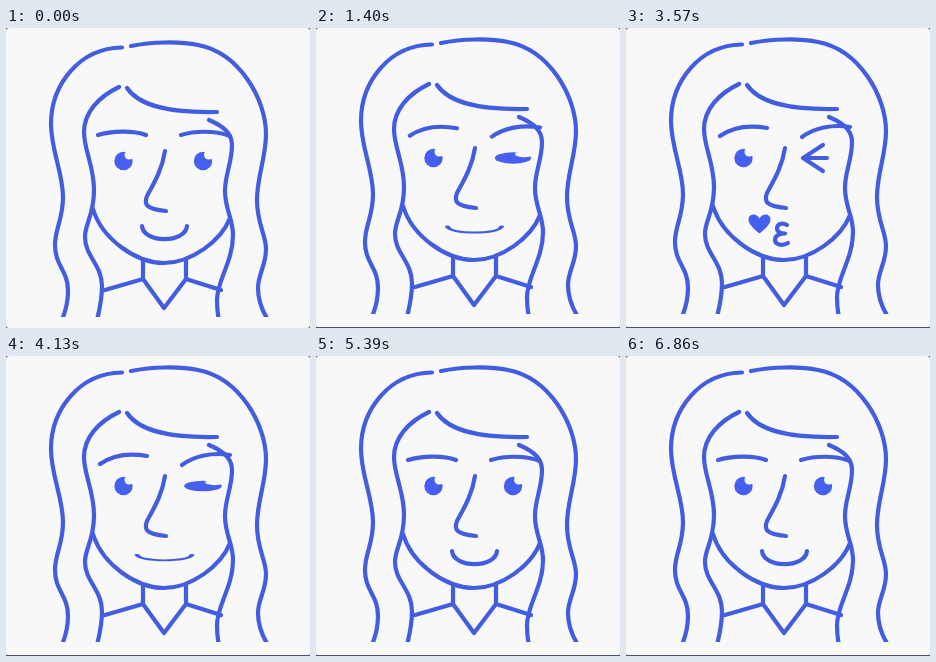
These frames come from a looping animation (304 px wide and 300 px high, 6.93 s). An HTML page:

```html
<!DOCTYPE html>
<html lang="en">
<head>
<meta charset="utf-8">
<title>Winking portrait</title>
<style>
  html, body { margin: 0; width: 100%; height: 100%; overflow: hidden; background: #55575f; }
  svg { display: block; width: 304px; height: 300px; }
  .ink { fill: none; stroke: #435de0; stroke-width: 4.2; stroke-linecap: round; stroke-linejoin: round; }
  .solid { fill: #4560ee; stroke: none; }
  .paper { fill: #f8f8f9; stroke: none; }
</style>
</head>
<body>
<svg viewBox="0 0 304 300">
  <defs>
    <clipPath id="crop"><rect width="304" height="289"/></clipPath>
    <g id="eye">
      <circle class="solid" r="9.2"/>
      <circle class="paper" cx="5.8" cy="-6.2" r="4.8"/>
    </g>
  </defs>
  <rect class="paper" width="304" height="300" rx="3"/>
  <rect id="edge" y="299" width="304" height="1" fill="#4b5079"/>

  <g id="figure">
    <g class="ink" clip-path="url(#crop)">
      <!-- hair -->
      <path d="M116 19.500C73 20 45 57 45 96C45 122 57 145 57 169C57 192 49 200 49 217C49 238 62 242 62 263Q62 277 56 292"/>
      <path d="M113 59C92 69 78 85 78 104C78 122 88 138 88 162C88 188 79 195 79 209C79 228 96 237 96 258Q96 272 91 292"/>
      <path d="M125 18C145 14 173 13 192 17C234 25 260 72 260 106C260 130 251 148 251 172C251 196 260 207 260 221C260 238 252 246 252 260Q252 276 262 292"/>
      <path d="M121 60C134 79 166 85 211 84"/>
      <path d="M203 92C217 98 226 105 226 117C226 135 219 146 219 163C219 182 227 190 227 207C227 234 211 252 211 272Q211 284 213 292"/>
      <!-- face, neck and collar -->
      <path d="M87 181C96 211 130 235 158 235C185 235 215 213 224 190"/>
      <path d="M137 232V251M180 232V251M99 262L137 251L158 280L180 251L215 262"/>
      <path d="M159 123C156 142 148 155 141 168C138 176 139 181 160 183"/>
    </g>
    <g class="ink">
      <path id="browLeft"/>
      <path id="browRight"/>
      <path id="mouth" d="M-22.500 -6.500C-21 11 21 11 22.500 -6.500"/>
      <path id="lashes"/>
      <path id="kiss" d="M5 -9C0 -12 -5 -10 -5 -5.500C-5 -2 -1 -.5 3 -.5C-3 -.5 -7 2 -7 6C-7 10.500 0 12.500 6 9"/>
    </g>
    <path id="heart" class="solid" d="M0 10C-5 6 -11 1 -11 -4C-11 -10 -3 -11 0 -5C3 -11 11 -10 11 -4C11 1 5 6 0 10Z"/>
    <use href="#eye" x="117.500" y="133"/>
    <use id="eyeRight" href="#eye"/>
  </g>
</svg>

<script>
const LOOP = 6930, SHIFT_AT = 1260;
const part = id => document.getElementById(id);

const ease = p => p * p * (3 - 2 * p);
const ramp = (t, from, to) => ease(Math.min(1, Math.max(0, (t - from) / (to - from))));
// Rises over one interval and falls over another
const pulse = (t, a, b, c, d) => ramp(t, a, b) * (1 - ramp(t, c, d));
const mix = (a, b, p) => a + (b - a) * p;

const BROW_LEFT = { rest: [92, 107, 105, 103, 127, 102, 140, 107], wink: [94, 111, 107, 102, 124, 100, 141, 103] };
const BROW_RIGHT = { rest: [175, 107, 188, 103, 208, 102, 224, 108], wink: [176, 112, 188, 103, 206, 99, 224, 102] };

function bendBrow(id, { rest, wink }, p) {
  const [x, y, ...curve] = rest.map((v, i) => mix(v, wink[i], p));
  part(id).setAttribute('d', `M${x} ${y}C${curve.join(' ')}`);
}

function place(id, x, y, sx, sy = sx) {
  part(id).setAttribute('transform', `translate(${x} ${y}) scale(${sx} ${sy})`);
  show(id, sx > 0.02 && sy > 0.02);
}

function show(id, visible) {
  part(id).style.display = visible ? '' : 'none';
}

function draw(t) {
  const squint = pulse(t, 1260, 1430, 4130, 4480);
  const wink = pulse(t, 1430, 1650, 3970, 4125);
  const heart = pulse(t, 1580, 1820, 3570, 3850);
  const shifted = t >= SHIFT_AT;

  part('figure').setAttribute('transform', `translate(0 ${shifted ? -3 : 0})`);
  show('edge', shifted);

  bendBrow('browLeft', BROW_LEFT, squint);
  bendBrow('browRight', BROW_RIGHT, squint);

  place('mouth', 158.5, 204.5, mix(1, 1.22, squint) * (1 - wink), mix(1, 0.42, squint));
  place('kiss', 156, 209, wink < 0.6 ? 0 : wink);
  place('heart', 133.5, 198.5, heart);

  place('eyeRight', 197, 133, mix(1, 2.05, squint), mix(1, 0.58, squint) * (1 - wink));
  const reach = 24 * wink, spread = 13 * wink;
  const tipX = 177 + reach * 0.83;
  part('lashes').setAttribute('d',
    `M${tipX} ${133 - spread}L177 133L${tipX} ${133 + spread}M177 133H${177 + reach}`);
  show('lashes', wink > 0.02);
}

function frame(now) {
  draw(now % LOOP);
  requestAnimationFrame(frame);
}
draw(0);
requestAnimationFrame(frame);
</script>
</body>
</html>
```
